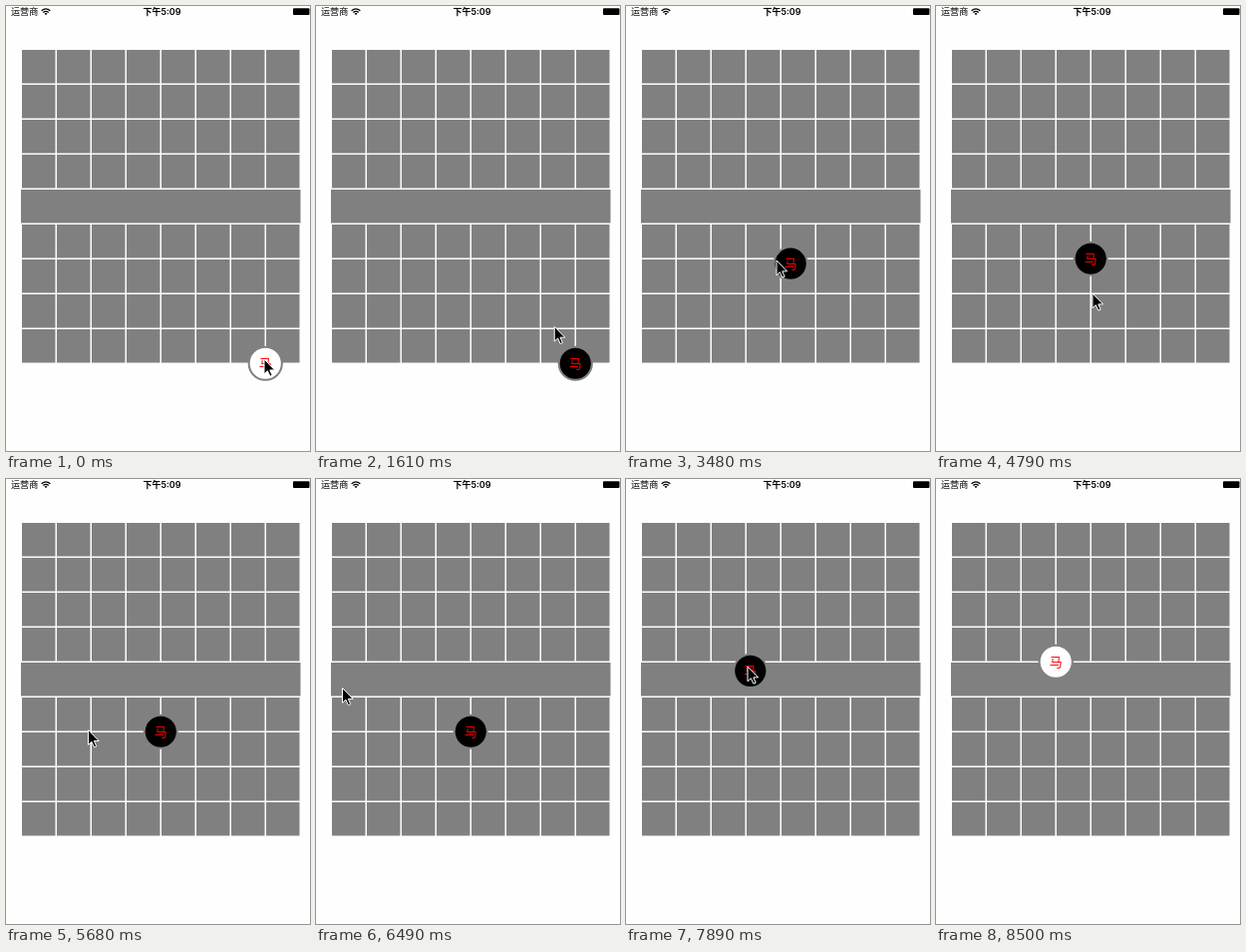
An HTML page for the animation above (8730 ms loop, 305 px wide and 446 px high).

```html
<!DOCTYPE html>
<html lang="zh">
<head>
<meta charset="utf-8">
<style>
  html, body { margin: 0; width: 100%; height: 100%; overflow: hidden; background: #fefefe; }
  svg { display: block; width: 305px; height: 446px; }
  text { font-family: "Noto Sans CJK SC", "Noto Sans CJK", sans-serif; }
  .clock { font-family: Inter, "Noto Sans CJK SC", "Noto Sans CJK", sans-serif; font-weight: 600; }
</style>
</head>
<body>
<svg viewBox="0 0 305 446">
  <text x="5" y="9.2" font-size="9.1">运营商</text>
  <g fill="none" stroke="#000" stroke-width="1.3">
    <path d="M35.6 4.8Q40 1 44.4 4.8M37.3 6.6Q40 4.2 42.7 6.6"/>
    <path d="M38.5 7.6Q40 6.5 41.5 7.6L40 9.2Z" fill="#000" stroke="none"/>
  </g>
  <text class="clock" x="156.5" y="9.2" font-size="9" text-anchor="middle">下午5:09</text>
  <rect x="288" y="2.2" width="16.5" height="6.8" rx="1"/>
  <g id="board" fill="#808080"></g>
  <g id="piece">
    <circle id="disc" r="16.6" stroke="#808080" stroke-width="2"/>
    <text y="4.7" font-size="13" font-weight="300" fill="#f00" text-anchor="middle">马</text>
  </g>
  <path id="cursor" d="M0 0V14.8L3.4 11.7L5.9 17.2L8.2 16.2L5.8 10.9H10.6Z" stroke="#fff"/>
</svg>
<script>
const LOOP = 8730, MOVE = 460, GLIDE = 330, EXIT = 8500;
const CELL = 35, LEFT = 15.25, TOP = 43.25, GAP = 1.5, RIVER = 4;
const $ = id => document.getElementById(id);

function addRect(x, y, width) {
  const r = document.createElementNS($('board').namespaceURI, 'rect');
  const box = { x, y, width, height: CELL - GAP };
  for (const k in box) r.setAttribute(k, box[k]);
  $('board').append(r);
}

for (let row = 0; row < 9; row++) {
  const y = TOP + row * CELL + GAP / 2;
  if (row === RIVER) addRect(LEFT - 0.25, y, 8 * CELL + 0.5);
  else for (let col = 0; col < 8; col++) addRect(LEFT + col * CELL + GAP / 2, y, CELL - GAP);
}

// Each turn: tap the piece, then it goes to a grid point
const home = [7, 9];
const turns = [
  { tap: 1410, go: 1910, to: [6, 7] },
  { tap: 2530, go: 3130, to: [4, 6] },
  { tap: 3860, go: 7535, to: [3, 4] }
];

// Pointer stops: arrival time, x, y
const stops = [
  [0, 259, 354], [960, 258, 356], [1780, 219, 284], [2300, 227, 295],
  [2810, 190, 272], [3080, 151, 255], [4250, 183, 257], [4790, 157, 288],
  [5280, 111, 250], [5840, 57, 253], [6170, 42, 253], [6490, 26.5, 209.5],
  [7020, 177, 163], [7360, 122, 188], [8380, 272, 439]
];

const clamp = k => Math.min(1, Math.max(0, k));
const ease = k => k * k * (3 - 2 * k);
const mix = (a, b, k) => a.map((v, i) => v + (b[i] - v) * k);
const place = (id, pos) => $(id).setAttribute('transform', `translate(${pos})`);

function pointerAt(t) {
  const i = stops.findIndex(s => s[0] > t);
  if (i < 0) return stops.at(-1).slice(1);
  const [left, ...from] = stops[i - 1], [arrive, ...to] = stops[i];
  const start = Math.max(left, arrive - GLIDE);
  return mix(from, to, ease(clamp((t - start) / (arrive - start))));
}

function pieceAt(t) {
  const spot = turns.reduce((p, { go, to }) => mix(p, to, ease(clamp((t - go) / MOVE))), home);
  return [LEFT + CELL * spot[0], TOP + CELL * spot[1]];
}

function draw(t) {
  const selected = turns.some(({ tap, go }) => t >= tap && t < go + MOVE);
  place('piece', pieceAt(t));
  $('disc').setAttribute('fill', selected ? '#000' : '#fff');
  place('cursor', pointerAt(t));
  $('cursor').style.display = t < EXIT ? '' : 'none';
}

const begin = performance.now();
function tick() {
  draw((performance.now() - begin) % LOOP);
  requestAnimationFrame(tick);
}
tick();
</script>
</body>
</html>
```
